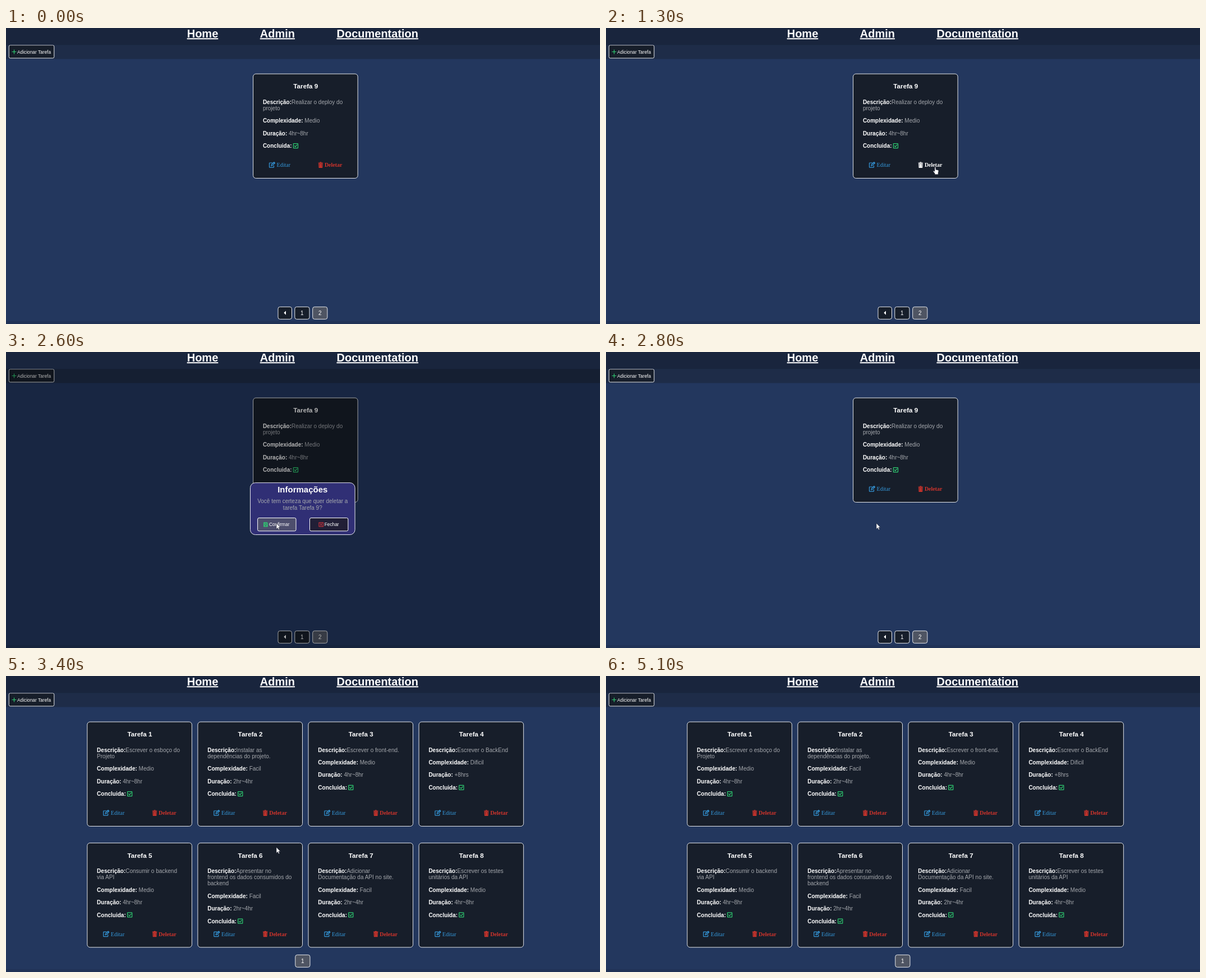
Write an HTML page that moves like this. It is 1059 px wide and 529 px high and loops after 5400 ms.

```html
<!DOCTYPE html>
<html lang="pt-BR">
<head>
<meta charset="utf-8">
<title>Tarefas</title>
<style>
  html, body { margin: 0; width: 100%; height: 100%; overflow: hidden; background: #23375e; }
  svg { display: block; font: 10px "Liberation Sans", Arial, sans-serif; fill: #fff; }
  text { white-space: pre; }
  .nav { font-size: 20px; font-weight: bold; text-decoration: underline; }
  .title { font-size: 11.7px; font-weight: bold; text-anchor: middle; }
  .mid { text-anchor: middle; }
  .value { fill: #a5a8ad; font-weight: normal; }
  .label { font-weight: bold; }
  .small { font-size: 8.33px; }
  .box { fill: #171e2a; stroke: #e6e8ec; }
  .active { fill: #50566a; fill: #4f5563; }
  .link { font-family: "Liberation Serif", Times, serif; }
  .icon { fill: none; stroke: currentColor; stroke-width: 1.2; stroke-linejoin: round; stroke-linecap: round; }
  .green { color: #2ecc71; }
  .edit { color: #3498db; fill: #3498db; }
  .delete { color: #d0342c; fill: #d0342c; font-weight: bold; }
  .hover .delete { color: #fff; fill: #fff; }
  .modal-button { fill: #211f36; stroke: #fff; }
  .hover .modal-button { fill: #4d4e6d; }
</style>
</head>
<body>
<svg id="stage" width="1059" height="529" viewBox="0 0 1059 529"></svg>
<script>
const LOOP = 5400, STEP = 100;

const text = (x, y, str, cls = '') => `<text x="${x}" y="${y}" class="${cls}">${str}</text>`;
const box = (x, y, w, h, r, cls = 'box') =>
  `<rect x="${x}" y="${y}" width="${w}" height="${h}" rx="${r}" class="${cls}"/>`;
const group = (id, body, cls = '') => `<g id="${id}" class="${cls}">${body}</g>`;
const icon = (x, y, d, cls = '') =>
  `<path transform="translate(${x} ${y})" class="icon ${cls}" d="${d}"/>`;

const ICONS = {
  plus: 'M0 3.5H7M3.5 0V7',
  check: 'M1 .6H8Q8.6 .6 8.6 1.2V8Q8.6 8.6 8 8.6H1Q.4 8.6 .4 8V1.2Q.4 .6 1 .6ZM2.3 4.6L4 6.3 7 3',
  edit: 'M6 2H1.2Q.6 2 .6 2.6V9.6Q.6 10.2 1.2 10.2H8Q8.6 10.2 8.6 9.6V7M4 7.2L4.3 5.3 9 .7 10.6 2.3 5.9 6.9ZM8 1.8L9.5 3.3',
  trash: 'M.5 1.5H8.1M3 1.2L3.4 .5H5.2L5.6 1.2M1.1 3H7.5L7.1 9.8H1.5ZM3 4V9M4.3 4V9M5.6 4V9',
  save: 'M.5 .5H6L7 1.5V7.5H.5ZM2 .5V2.7H5V.5M2 7.5V4.5H5.5V7.5',
  close: 'M.5 .5H8V7.5H.5ZM2.8 2.5L5.7 5.5M5.7 2.5L2.8 5.5'
};

// Places one task card; the rows below follow the number of description lines.
function card(x, y, number, lines, level, duration) {
  const row = i => y + 53.6 + 11.22 * (lines.length - 1 + 2 * i);
  const field = (i, name, value) =>
    text(x + 17.3, row(i), `${name}: <tspan class="value">${value}</tspan>`, 'label');
  const [first, ...rest] = lines;
  return box(x, y, 186.6, 186.5, 5) +
    text(x + 93.7, y + 26.4, 'Tarefa ' + number, 'title') +
    text(x + 17.3, y + 53.6, `Descrição:<tspan class="value">${first}</tspan>`, 'label') +
    rest.map((line, i) => text(x + 17.3, y + 53.6 + 11.22 * (i + 1), line, 'value')).join('') +
    field(1, 'Complexidade', level) +
    field(2, 'Duração', duration) +
    field(3, 'Concluida', '') +
    icon(x + 71.3, row(3) - 8.2, ICONS.check, 'green') +
    `<g class="link edit">${icon(x + 28.3, y + 157, ICONS.edit)}${text(x + 42, y + 166.4, 'Editar')}</g>` +
    `<g class="link delete">${icon(x + 116, y + 157.5, ICONS.trash)}${text(x + 127.3, y + 166.4, 'Deletar')}</g>`;
}

const MEDIUM = ['Medio', '4hr~8hr'], EASY = ['Facil', '2hr~4hr'], HARD = ['Dificil', '+8hrs'];
const tasks = [
  [['Escrever o esboço do', 'Projeto'], MEDIUM],
  [['Instalar as', 'dependências do projeto.'], EASY],
  [['Escrever o front-end.'], MEDIUM],
  [['Escrever o BackEnd'], HARD],
  [['Consumir o backend', 'via API'], MEDIUM],
  [['Apresentar no', 'frontend os dados consumidos do', 'backend'], EASY],
  [['Adicionar', 'Documentação da API no site.'], EASY],
  [['Escrever os testes', 'unitários da API'], MEDIUM]
];
const grid = tasks.map(([lines, info], i) =>
  card(144.8 + 197.1 * (i % 4), 82 + 216.4 * (i >> 2), i + 1, lines, ...info)).join('');

const page = (x, label, cls = '') =>
  box(x, 498.4, 26.2, 22, 3.5, 'box ' + cls) + text(x + 13.1, 512.6, label, 'mid');
const back = x => box(x, 498.4, 24.5, 22, 3.5) + `<path d="M${x + 14} 505.4v7.4l-3.7-3.7z"/>`;

const modalButton = (id, x, name, label, color) => group(id,
  box(x, 296.5, 68.4, 23.4, 2.5, 'modal-button') +
  `<g color="${color}">${icon(x + (name === 'save' ? 10.6 : 16), 304.3, ICONS[name])}</g>` +
  text(x + (name === 'save' ? 20.3 : 26.2), 311.3, label, 'small'));

const stage = document.getElementById('stage');
stage.innerHTML =
  box(0, 0, 1059, 529, 0, '" fill="#23375e') +
  box(0, 30, 1059, 25.5, 0, '" fill="#1e2c48') +
  box(0, 524, 1059, 5, 0, '" fill="#203256') +
  box(5.2, 30.7, 80.6, 23.2, 2.5) +
  `<g stroke-width="1.6">${icon(11, 39, ICONS.plus, 'green')}</g>` +
  text(20, 45.6, 'Adicionar Tarefa', 'small') +
  group('lastCard', card(440.6, 82, 9, ['Realizar o deploy do', 'projeto'], ...MEDIUM)) +
  group('cards', grid) +
  group('pagesTwo', back(485) + page(514.8, 1) + page(546.7, 2, 'active')) +
  group('pagesBack', back(500) + page(530.8, 1)) +
  group('pagesOne', page(515.8, 1, 'active')) +
  group('shade', box(0, 30, 1059, 499, 0, '" fill="#000" opacity=".3')) +
  box(0, 0, 1059, 30.3, 0, '" fill="#19253d') +
  text(322.7, 17.2, 'Home', 'nav') + text(452.8, 17.2, 'Admin', 'nav') +
  text(589.5, 17.2, 'Documentation', 'nav') +
  group('modal',
    box(435.5, 233.7, 186.6, 92.8, 9, '" fill="#302f75" stroke="#e8e8f0') +
    `<g font-size="15" font-weight="bold">${text(528.8, 250.8, 'Informações', 'mid')}</g>` +
    text(528.8, 270.3, 'Você tem certeza que quer deletar a', 'mid value') +
    text(528.8, 281.6, 'tarefa Tarefa 9?', 'mid value') +
    modalButton('confirm', 448.6, 'save', 'Confirmar', '#2ecc71') +
    modalButton('dismiss', 541.5, 'close', 'Fechar', '#c0303a')) +
  group('cursor',
    '<path id="arrow" d="M0 0V10.4L2.4 8.2 4 11.8 5.7 11 4.2 7.6H7.2Z"/>' +
    '<path id="hand" d="M-1 1Q0 -.4 1 1V5L5 5.9Q6.2 6.3 6 7.8L5.2 11V13.8H-.8V12L-3.6 8.4Q-3.8 7 -2.4 7.2L-1 8.4Z"/>',
    '" stroke="#1b2130" stroke-width=".6');

const el = Object.fromEntries([...stage.querySelectorAll('[id]')].map(node => [node.id, node]));
const show = (id, on) => { el[id].style.display = on ? '' : 'none'; };

// Pointer path: time, x, y
const path = [
  [100, 17, 0], [600, 343, 163], [900, 581, 253], [1000, 581, 253], [1100, 586, 251],
  [1200, 586, 251], [1300, 587, 248], [1700, 587, 248], [2300, 482, 306],
  [4300, 482, 306], [4900, 71, 10], [5000, 66, 0], [5100, 66, 0]
];
function pointerAt(t) {
  const i = Math.max(1, path.findIndex(p => p[0] >= t));
  const [t0, x0, y0] = path[i - 1], [t1, x1, y1] = path[i];
  const k = (t - t0) / (t1 - t0);
  return [x0 + (x1 - x0) * k, y0 + (y1 - y0) * k];
}

function render(now) {
  const t = Math.floor(now % LOOP / STEP) * STEP;
  const during = (from, to) => t >= from && t < to;
  const modalOpen = during(1600, 2800);
  const overDelete = during(1300, 1600), overConfirm = during(2200, 2800);
  const hand = overDelete || during(2200, 2600);
  const visible = during(100, 5100);

  show('lastCard', t < 3200);
  show('pagesTwo', t < 3200);
  show('pagesBack', during(3200, 3400));
  show('cards', t >= 3400);
  show('pagesOne', t >= 3400);
  show('shade', modalOpen);
  show('modal', modalOpen);
  el.lastCard.classList.toggle('hover', overDelete);
  el.confirm.classList.toggle('hover', overConfirm);

  show('cursor', visible);
  show('hand', hand);
  show('arrow', !hand);
  if (visible) el.cursor.setAttribute('transform', `translate(${pointerAt(t)})`);
  requestAnimationFrame(render);
}
render(performance.now());
</script>
</body>
</html>
```
